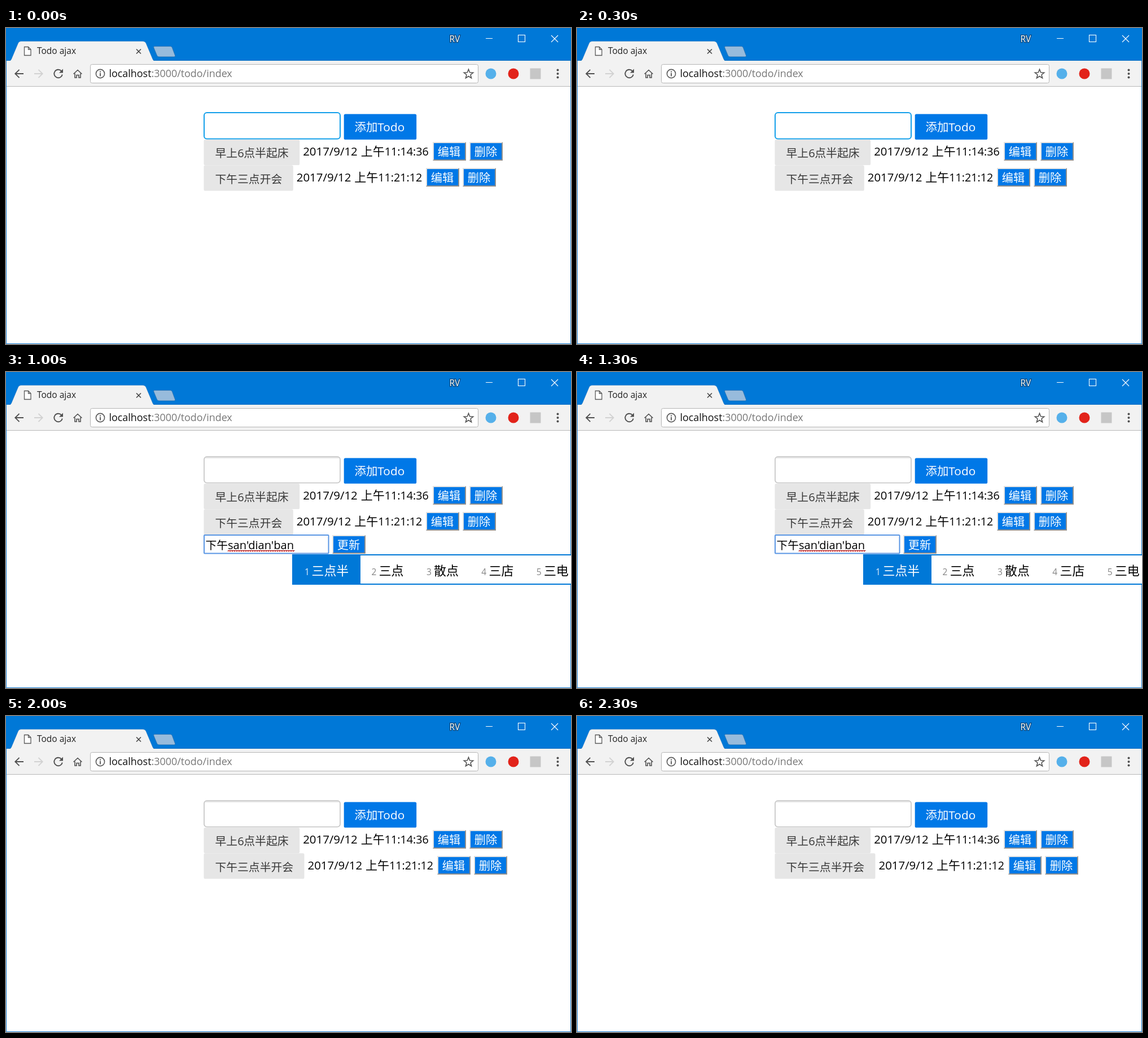
An HTML page that plays this animation: 1001 by 560 pixels, repeating every 2.5 s.

```html
<!DOCTYPE html>
<html lang="zh-CN">
<head>
<meta charset="utf-8">
<title>Todo ajax</title>
<style>
html, body { margin: 0; width: 100%; height: 100%; overflow: hidden; background: #fff; }
svg { display: block; width: 1001px; height: 560px; }
text { font-family: "Open Sans", "Noto Sans", "Noto Sans CJK SC", "Noto Sans CJK", sans-serif; white-space: pre; }
</style>
</head>
<body>
<svg viewBox="0 0 1001 560">
  <rect width="1001" height="560" fill="#fff"/>

  <!-- title bar and tab -->
  <rect width="1001" height="58" fill="#0078d7"/>
  <path d="M0 57.5H1001" stroke="#0b62ac" stroke-opacity=".5"/>
  <path d="M5 59Q8.500 58 9.500 55.500L21.500 27Q23 23.500 27 23.500H242Q246.500 23.500 248 27L260 55.500Q261 58 264 59Z" fill="#f2f2f2" stroke="#0b62ac" stroke-opacity=".4" stroke-width=".8"/>
  <path d="M263 32.500H291Q293.500 32.500 294.300 34.500L299.500 48.500Q300.300 51 298 51H271Q268.500 51 267.600 49L261.800 35Q261 32.500 263 32.500Z" fill="#97bbdc" stroke="#2a70ac" stroke-width=".8"/>
  <path d="M32.500 33.500H39.500L44 38V48.500H32.500ZM39.500 33.500V38H44" fill="#fff" stroke="#5a5a5a" stroke-width="1.300"/>
  <text x="55" y="46" font-size="15.500" fill="#222">Todo ajax</text>
  <path d="M231 37.500L239 45.500M239 37.500L231 45.500" stroke="#444" stroke-width="1.600"/>

  <!-- window controls -->
  <text x="785.500" y="25" font-size="15.500" fill="#fff" stroke="#123" stroke-opacity=".55" stroke-width="2.500" paint-order="stroke">RV</text>
  <g fill="none" stroke="#fff" stroke-width="1.100">
    <path d="M850 18.500H862M966 13L978 25M978 13L966 25"/>
    <rect x="907.500" y="12.500" width="12" height="12"/>
  </g>

  <!-- toolbar -->
  <rect y="58" width="1001" height="45" fill="#f2f2f2"/>
  <path d="M0 103.500H1001" stroke="#b8b8b8"/>
  <g fill="none" stroke="#505050" stroke-width="1.900">
    <path d="M31 81H16.500M23.500 73.800L16.300 81L23.500 88.200"/>
    <path d="M50 81H64.500M57.500 73.800L64.700 81L57.500 88.200" stroke="#d2d2d2"/>
    <path d="M98 76A7.300 7.300 0 1 0 99.800 82.500"/>
    <path d="M101 72.500V79.500H94Z" fill="#505050" stroke="none"/>
    <path d="M119.500 81.500L127 74.500L134.500 81.500M122 80.500V88H125V83.500H129V88H132V80.500" stroke-width="1.600"/>
  </g>
  <rect x="149.500" y="64.500" width="687" height="33" rx="3" fill="#fff" stroke="#b4b4b4"/>
  <circle cx="167" cy="81" r="7.600" fill="none" stroke="#5a5a5a" stroke-width="1.600"/>
  <path d="M167 76.400V78.400M167 79.800V85.500" stroke="#5a5a5a" stroke-width="1.900"/>
  <text x="182.500" y="87" font-size="17.900" fill="#111">localhost<tspan fill="#777">:3000/todo/index</tspan></text>
  <path id="star" fill="none" stroke="#555" stroke-width="1.600"/>
  <circle cx="859" cy="81" r="9.500" fill="#55b0ea"/>
  <circle cx="899" cy="81" r="9.500" fill="#e2231a"/>
  <rect x="928.500" y="71.500" width="19" height="19" fill="#c6c6c6"/>
  <g fill="#505050">
    <circle cx="977.500" cy="74.500" r="2"/><circle cx="977.500" cy="81" r="2"/><circle cx="977.500" cy="87.500" r="2"/>
  </g>

  <path d="M.5 58V559.500H1000.500V58" fill="none" stroke="#1a80d6"/>
  <g id="page"></g>
</svg>
<script>
const LOOP = 2500, STEP = 500;
const BLUE = '#0078e7', IME_BLUE = '#0078d7';
const page = document.getElementById('page');

const text = (x, y, str, size, fill = '#000') =>
  `<text x="${x}" y="${y}" font-size="${size}" fill="${fill}">${str}</text>`;
const rect = (x, y, w, h, fill, extra = '') =>
  `<rect x="${x}" y="${y}" width="${w}" height="${h}" fill="${fill}" ${extra}/>`;
const path = (d, attrs) => `<path d="${d}" ${attrs}/>`;

function starPath(cx, cy, outer, inner) {
  const points = Array.from({ length: 10 }, (_, i) => {
    const r = i % 2 ? inner : outer, a = i * Math.PI / 5 - Math.PI / 2;
    return `${(cx + r * Math.cos(a)).toFixed(2)} ${(cy + r * Math.sin(a)).toFixed(2)}`;
  });
  return `M${points.join('L')}Z`;
}

// Small button with an outset border
function smallButton(x, y, label, focused) {
  const w = 59, h = 33;
  const ring = focused
    ? rect(x - .5, y - .5, w + 1, h + 1, 'none', 'rx="2" stroke="#5b96e6" stroke-width="2"') : '';
  return rect(x, y, w, h, '#e3e3e3')
    + path(`M${x + w} ${y}V${y + h}H${x}l2 -2H${x + w - 2}V${y + 2}Z`, 'fill="#8f8f8f"')
    + rect(x + 2, y + 2, w - 4, h - 4, BLUE)
    + text(x + 8.8, y + 24.9, label, 20.2, '#fff') + ring;
}

// parts: [x, string, size] runs of the task label
function row(top, width, parts, time, focused) {
  const x = 350.5 + width;
  const buttonX = Math.round(x + 235.3), buttonY = Math.round(top + 4.4);
  const label = parts.map(([px, str, size]) => text(px, top + 31.2, str, size, '#383838')).join('');
  return rect(350.5, top, width, 45.2, '#e6e6e6', 'rx="2.600"') + label
    + text(x + 6, top + 28.5, '2017/9/12', 20.4)
    + text(x + 108.5, top + 28.5, '上午', 21)
    + text(x + 150.5, top + 28.5, time, 19.7)
    + smallButton(buttonX, buttonY, '编辑', focused)
    + smallButton(buttonX + 65, buttonY, '删除');
}

function newTaskBar(focused) {
  const border = focused ? '#129fea' : '#c2c2c2';
  const shade = focused ? '' : path('M353 152H590', 'stroke="#e4e4e4" stroke-width="2"');
  return rect(351, 150, 241, 46.5, '#fff', `rx="5" stroke="${border}" stroke-width="${focused ? 2 : 1.6}"`) + shade
    + rect(598.7, 152.6, 128.5, 45.2, BLUE, 'rx="2.600"')
    + text(617.5, 183.3, '添加', 20.4, '#fff') + text(658.3, 183.3, 'Todo', 20.8, '#fff');
}

function editor(focused, content) {
  const box = focused
    ? rect(351, 289, 220.5, 32.5, '#fff', 'rx="1" stroke="#5a96e4" stroke-width="2"')
    : rect(350.5, 289.5, 221, 32, '#fff', 'stroke="#b2b2b2"');
  return box + content + smallButton(578, 289, '更新');
}

function composing() {
  let wave = 'M393 318';
  for (let x = 395; x < 512; x += 2) wave += `L${x} ${x % 4 === 3 ? 316 : 318}`;
  return text(353.5, 314, '下午', 19.8) + text(393, 313.5, "san'dian'ban", 20.1)
    + path('M393 316.500H511.500', 'stroke="#222"')
    + path(wave, 'fill="none" stroke="#e03030" stroke-width="1.200"');
}

function candidates() {
  const top = 323, bottom = 377, words = ['三点', '散点', '三店', '三电'];
  return rect(507, top, 500, bottom - top, '#fff')
    + rect(507, top, 500, 2, IME_BLUE) + rect(507, bottom - 2, 500, 2, IME_BLUE)
    + rect(507, top, 121, bottom - top, IME_BLUE)
    + text(529, 359.5, '1', 15.5, '#e4f0fb') + text(541.5, 360.3, '三点半', 21.9, '#fff')
    + words.map((word, i) => text(647.5 + 97.4 * i, 359.5, i + 2, 15.5, '#858585')
      + text(660.7 + 97.4 * i, 360.3, word, 21.9)).join('');
}

const typed = () => text(353.5, 314, '下午三点半开会', 19.7)
  + path('M491.500 294V318.500', 'stroke="#000" stroke-width="1.200"');

function draw(step) {
  const saved = step === 4;
  const task = saved ? '下午三点半开会' : '下午三点开会';
  let out = newTaskBar(step === 0)
    + row(197.8, 169.7, [[370.5, '早上', 19.8], [410.2, '6', 20], [421.2, '点半起床', 19.9]], '11:14:36')
    + row(243.3, saved ? 178 : 158.3, [[370.5, task, 19.8]], '11:21:12', step === 1);
  if (step === 1) out += editor(false, '');
  if (step === 2) out += editor(true, composing()) + candidates();
  if (step === 3) out += editor(true, typed());
  page.innerHTML = out;
}

document.getElementById('star').setAttribute('d', starPath(819.5, 81.8, 8.6, 3.7));

let shown = -1;
function tick() {
  const step = Math.floor(performance.now() % LOOP / STEP);
  if (step !== shown) draw(shown = step);
  requestAnimationFrame(tick);
}
tick();
</script>
</body>
</html>
```
